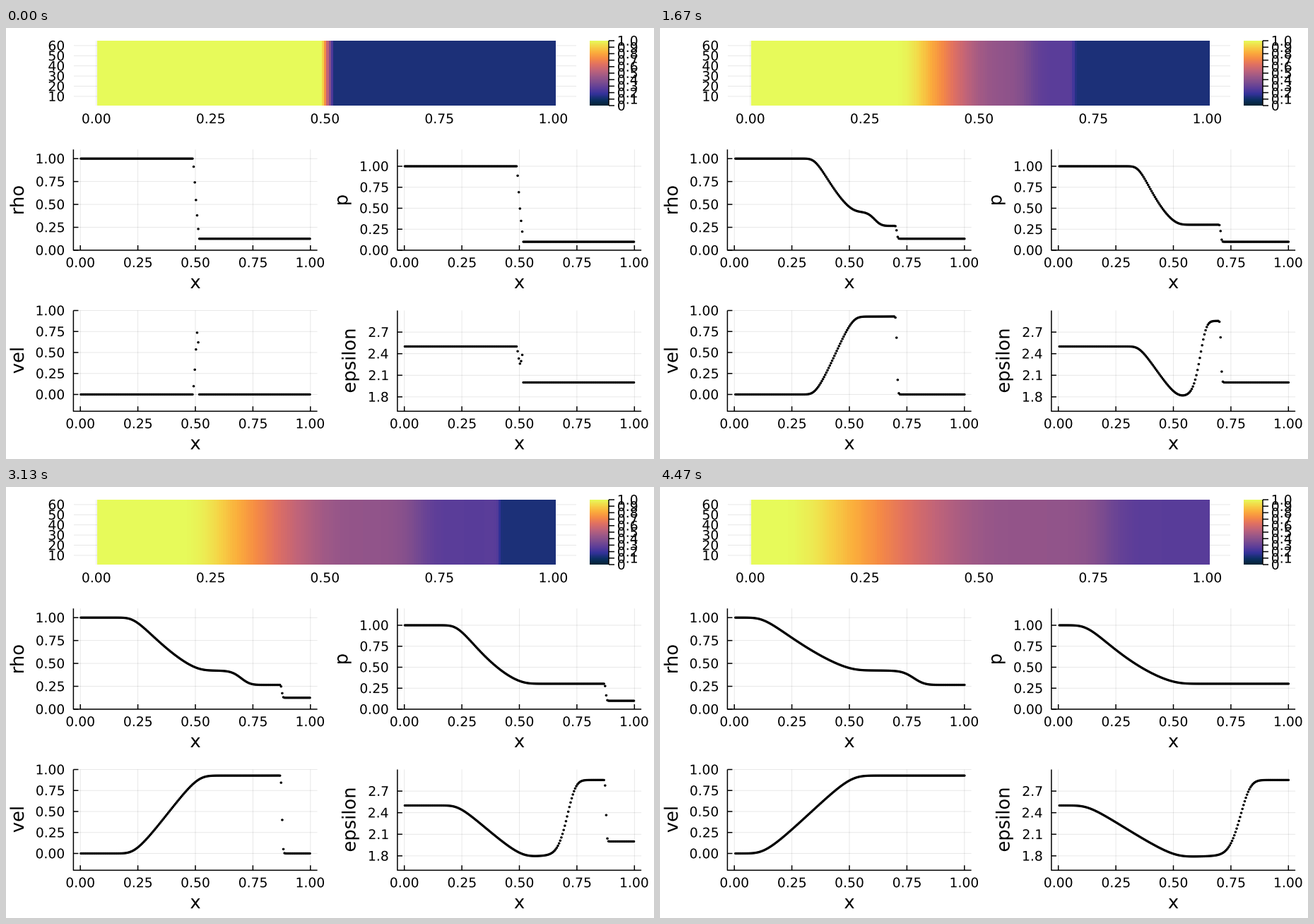
A matplotlib script that plays this animation: 917 px wide and 611 px high, repeating every 4.54 s.

```python
"""Shock tube: density strip plus four profile panels, solved on a staggered grid."""
import numpy as np
import matplotlib.pyplot as plt
from matplotlib.animation import FuncAnimation
from matplotlib.collections import LineCollection, PathCollection
from matplotlib.colors import LinearSegmentedColormap
from matplotlib.textpath import TextPath
from matplotlib.transforms import Affine2D

W, H, DPI = 917, 611, 100
PX = 72 / DPI                      # one pixel in points
LOOP, SLOT = 4540, 20              # ms
STATES = 68                        # pictures per loop, 15 per second
TICK_SIZE, GUIDE_SIZE = 18.75, 25.8

# ---- solver ---------------------------------------------------------------
N, GAMMA = 200, 1.4
DX, DT = 1 / N, 0.00114
FIRST_STEP, STEPS_PER_STATE = 5.56, 3.87


def primitives(U):
    rho, mom, energy = U
    vel = mom / rho
    p = (GAMMA - 1) * (energy - 0.5 * mom * vel)
    return rho, p, vel, p / ((GAMMA - 1) * rho)


def flux(U):
    _, p, vel, _ = primitives(U)
    return np.array([U[1], U[1] * vel + p, (U[2] + p) * vel])


def solve():
    """Staggered Lax-Friedrichs; each step is one cell shorter than the last."""
    half = 260
    left, right = [1, 0, 2.5], [0.125, 0, 0.25]
    U = np.array([left] * half + [right] * half, float).T
    wanted = [int(FIRST_STEP + STEPS_PER_STATE * n) for n in range(STATES)]
    states = []
    for step in range(1, wanted[-1] + 1):
        U = (U[:, 1:] + U[:, :-1]) / 2 - DT / DX * np.diff(flux(U), axis=1)
        if step in wanted:
            mid = U.shape[1] // 2
            # odd steps live half a cell to the left
            x = (np.arange(1, N + 1) - 0.5 * (step % 2)) * DX
            window = U[:, mid - N // 2:mid + N // 2]
            states.append((x, primitives(window)))
    return states


states = solve()

# ---- canvas ---------------------------------------------------------------
plt.rcParams["font.family"] = "DejaVu Sans"
fig = plt.figure(figsize=(W / DPI, H / DPI), dpi=DPI, facecolor="white")
ax = fig.add_axes([0, 0, 1, 1])
ax.axis("off")

grid, strokes, glyphs = [], [], []


def text(s, px, py, size=TICK_SIZE, align="center", upright=True):
    """Place text with its baseline at the given pixel."""
    path = TextPath((0, 0), s, size=size)
    box = path.get_extents()
    shift = {"left": 0, "center": (box.x0 + box.x1) / 2, "right": box.x1}[align]
    move = Affine2D().translate(-shift, 0).scale(1, -1)
    if not upright:
        move.rotate_deg(-90)
    glyphs.append(move.translate(px, py).transform_path(path))


def tick_text(s, px, py, align):
    text(s, px, py + 6.8, align=align)


def add_lines(segments, color, width, **kw):
    lines = LineCollection(segments, colors=[color], linewidths=width * PX,
                           snap=False, **kw)
    return ax.add_collection(lines)


# ---- density strip and colour bar -----------------------------------------
thermal = LinearSegmentedColormap.from_list("thermal", [
    "#032333", "#0d3064", "#35329b", "#5d3e99", "#7e4d8f", "#9e5987",
    "#c16479", "#e17161", "#f68b45", "#fbad3c", "#f6d346", "#e7fa5a"])
TOP, BOTTOM = 18, 110


def strip(values, x0, x1):
    return ax.imshow(values, extent=(x0, x1, BOTTOM, TOP), cmap=thermal,
                     vmin=0, vmax=1, aspect="auto", interpolation="nearest")


heat = strip(np.ones((1, N)), 129, 778)
strip(np.linspace(1, 0, 256)[:, None], 826, 853)

for v in np.linspace(0, 1, 5):
    px = 127.8 + 647 * v
    grid.append([(px, TOP), (px, BOTTOM)])
    tick_text(f"{v:.2f}", px, 128.3, "center")
for v in range(10, 70, 10):
    py = 111.3 - 1.44 * v
    grid.append([(96, py), (807, py)])
    tick_text(str(v), 82, py, "right")

strokes.append([(853, TOP), (853, BOTTOM)])
for k in range(11):
    py = BOTTOM + (TOP - BOTTOM) * k / 10
    strokes.append([(853, py), (861, py)])
    tick_text(f"{k / 10:.1f}" if k else "0", 864.8, py, "left")


# ---- profile panels -------------------------------------------------------
PANEL_W, PANEL_H, UNIT = 345.2, 142.8, 325.6
DOT, DOT_STRETCH = 3.4, 0.3


class Panel:
    def __init__(self, name, left, top, limits, ticks, fmt, guide_x):
        self.left, self.bottom = left, top + PANEL_H
        self.low, high = limits
        self.scale = PANEL_H / (high - self.low)
        right = left + PANEL_W
        strokes.append([(left, top), (left, self.bottom), (right, self.bottom)])
        for v in np.linspace(0, 1, 5):
            px = self.px(v)
            grid.append([(px, top), (px, self.bottom)])
            strokes.append([(px, self.bottom), (px, self.bottom - 7)])
            tick_text(f"{v:.2f}", px, self.bottom + 17.3, "center")
        for v in ticks:
            py = self.py(v)
            grid.append([(left, py), (right, py)])
            strokes.append([(left, py), (left + 7, py)])
            tick_text(fmt.format(v), left - 13.4, py, "right")
        text("x", left + PANEL_W / 2, self.bottom + 54, GUIDE_SIZE)
        text(name, guide_x, top + PANEL_H / 2, GUIDE_SIZE, upright=False)
        # very short round-capped strokes keep the dots off the pixel grid
        self.dots = add_lines([], "black", DOT, capstyle="round", zorder=4)

    def px(self, v):
        return self.left + 9.8 + UNIT * v

    def py(self, v):
        return self.bottom - (v - self.low) * self.scale

    def show(self, x, values):
        px, py = self.px(x), self.py(values)
        ends = [np.column_stack([px + side * DOT_STRETCH / 2, py])
                for side in (-1, 1)]
        self.dots.set_segments(np.stack(ends, axis=1))


LEFT, RIGHT, UPPER, LOWER = 95.4, 553.9, 172.2, 400.5
quarters = np.linspace(0, 1, 5)
panels = [
    Panel("rho", LEFT, UPPER, (0, 1.1), quarters, "{:.2f}", 25),
    Panel("p", RIGHT, UPPER, (0, 1.2), quarters, "{:.2f}", 483.3),
    Panel("vel", LEFT, LOWER, (-0.2, 1), quarters, "{:.2f}", 25),
    Panel("epsilon", RIGHT, LOWER, (1.6, 3), (1.8, 2.1, 2.4, 2.7), "{:.1f}", 494.5),
]

add_lines(grid, (0, 0, 0, 0.1), 0.9, zorder=-1)
add_lines(strokes, "black", 1.5, zorder=2)
ax.add_collection(PathCollection(glyphs, facecolors="black",
                                 linewidths=0, zorder=3))
ax.set_xlim(0, W)
ax.set_ylim(H, 0)


# ---- motion ---------------------------------------------------------------
def update(slot):
    ms = SLOT * (slot + 0.5)
    # state starts are rounded to 10 ms, hence the small lead
    x, fields = states[min(int((ms + 3.4) * 15 / 1000), STATES - 1)]
    heat.set_data(fields[0][None])
    for panel, values in zip(panels, fields):
        panel.show(x, values)
    return [heat] + [panel.dots for panel in panels]


anim = FuncAnimation(fig, update, frames=LOOP // SLOT, interval=SLOT,
                     repeat=True, repeat_delay=0)
plt.show()
```
